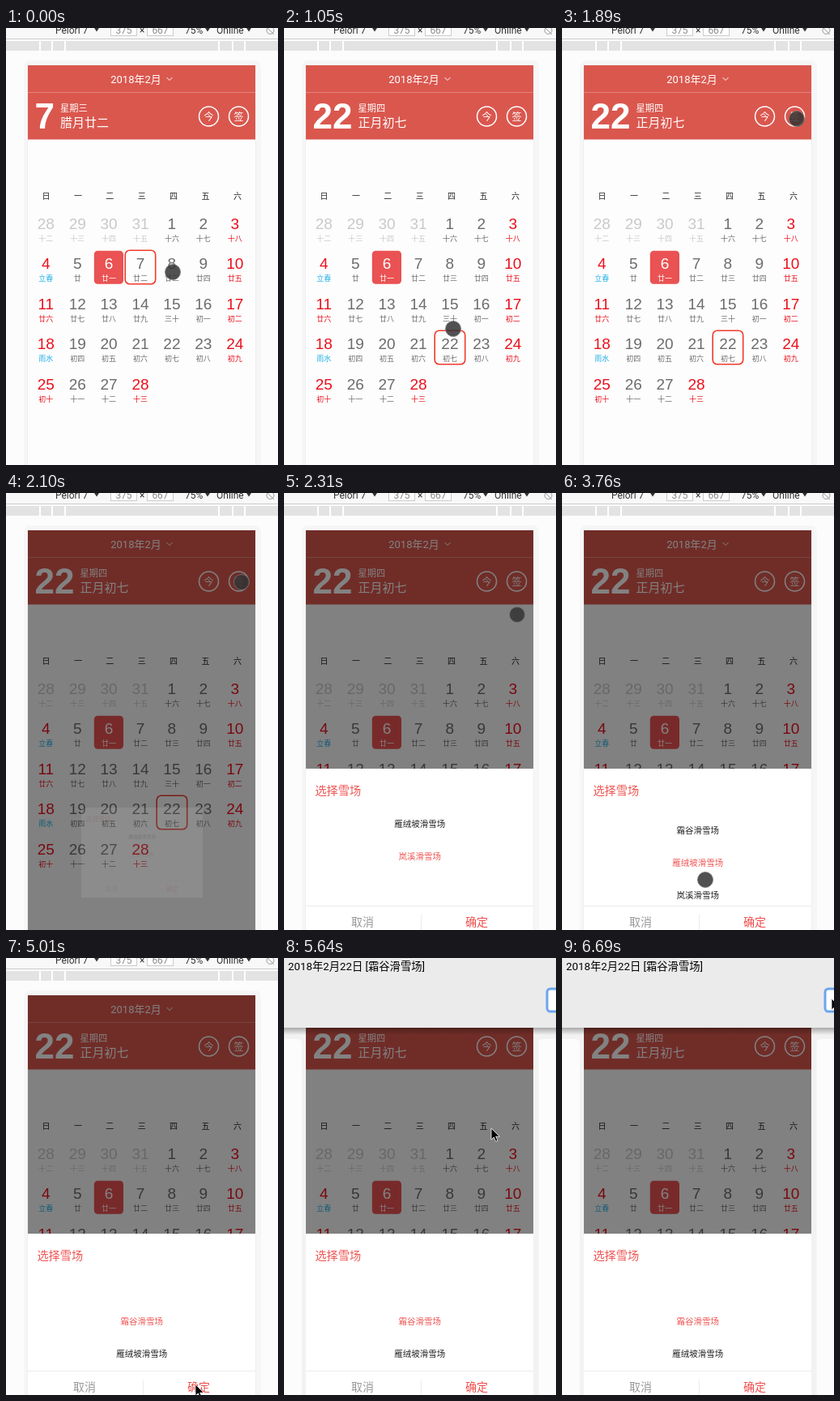
These frames come from a looping animation (336 by 539 pixels, 8000 ms). An HTML page:

```html
<!DOCTYPE html>
<html lang="zh-CN">
<head>
<meta charset="utf-8">
<title>日历签到</title>
<style>
html, body { margin: 0; width: 336px; height: 539px; overflow: hidden; background: #fcfcfc; }
svg { display: block; font-family: Roboto, "Noto Sans CJK SC", "Noto Sans CJK", sans-serif; }
.mid { text-anchor: middle; }
.bar { font-size: 12px; fill: #333; }
.size { font-size: 12px; fill: #8a8a8a; text-anchor: middle; }
.num { font: 19px "Liberation Sans", Arial, sans-serif; fill: #6c6c6c; }
.lunar { font-size: 9px; fill: #6c6c6c; }
.week { font-size: 10px; fill: #222; }
.soft text { fill: #c9c9c9; }
.rest text { fill: #ea101c; }
.term .lunar { fill: #22b0e6; }
.today text { fill: #fff; }
.light { fill: #fff; }
.line { fill: none; stroke: #fff; }
.item { font-size: 10.5px; font-weight: 500; fill: #222; text-anchor: middle; }
.item.on { font-weight: 400; fill: #ee5553; }
</style>
</head>
<body>
<svg width="336" height="539" viewBox="0 0 336 539">
  <defs>
    <linearGradient id="shade" x2="0" y2="1">
      <stop offset="0" stop-opacity=".3"/>
      <stop offset="1" stop-opacity="0"/>
    </linearGradient>
    <clipPath id="wheelClip"><rect x="27" y="389" width="281" height="119"/></clipPath>
  </defs>

  <rect width="336" height="539" fill="#fcfcfc"/>
  <rect width="336" height="13" fill="#f8f8f8"/>
  <rect y="13" width="336" height="1" fill="#c9c9c9"/>
  <g class="bar">
    <text x="61" y="7">Pelori 7</text>
    <text x="165" y="7">×</text>
    <text x="221" y="7">75%</text>
    <text x="260" y="7">Online</text>
    <path d="M109 0h6l-3 4.500zM246 0h6l-3 4.500zM297 0h6l-3 4.500z"/>
  </g>
  <g fill="#fff" stroke="#ccc"><rect x="129.500" y="-6.500" width="32" height="16"/><rect x="174.500" y="-6.500" width="32" height="16"/></g>
  <text class="size" x="145.500" y="7">375</text>
  <text class="size" x="190.500" y="7">667</text>
  <path d="M322 3a4.500 4.500 0 1 0 9 0a4.500 4.500 0 1 0-9 0M322 -1l9 9" fill="none" stroke="#999"/>
  <rect y="16" width="336" height="12" fill="#e3e3e3"/>
  <path d="M42 16v12M57 16v12M73 16v12M263 16v12M280 16v12M295 16v12" stroke="#fff" stroke-width="2"/>
  <rect x="22" y="40" width="293" height="520" rx="8" fill="#f6f6f6"/>
  <rect x="26" y="45" width="283" height="520" fill="#efefef"/>

  <rect x="27" y="46" width="281" height="493" fill="#fdfdfd"/>
  <rect x="27" y="46" width="281" height="91.500" fill="#da574e"/>
  <rect x="27" y="79" width="281" height="1" fill="#e5857e"/>
  <text class="mid light" x="160.500" y="68" font-size="13">2018年2月</text>
  <path class="line" d="M198.500 61l3.500 3.500l3.500-3.500"/>
  <text id="day" class="light" x="35.500" y="124" font-size="44" font-weight="700" font-family="Liberation Sans, Arial, sans-serif"></text>
  <g id="info" class="light">
    <text id="weekday" x="67" y="102.500" font-size="11.200"></text>
    <text id="lunarDay" x="67" y="121.500" font-size="15"></text>
  </g>
  <g class="line" stroke-width="1.500"><circle cx="250.500" cy="109" r="12"/><circle cx="287.500" cy="109" r="12"/></g>
  <g class="mid light" font-size="12"><text x="250.500" y="113.500">今</text><text x="287.500" y="113.500">签</text></g>
  <g id="calendar"></g>
  <rect id="pick" width="37.500" height="41.500" rx="5.500" fill="none" stroke="#f13a2c" stroke-width="1.600"/>
  <rect id="mask" x="27" y="46" width="281" height="493" opacity=".49"/>

  <g id="panel">
    <rect x="27" y="340" width="281" height="208" fill="#fff"/>
    <text x="38.400" y="372" font-size="14.200" fill="#ee5553">选择雪场</text>
    <g clip-path="url(#wheelClip)"><g id="wheel"></g></g>
    <path d="M27 509.500h281M169.500 520v19" stroke="#ececec"/>
    <g class="mid" font-size="14"><text x="97" y="533.500" fill="#999">取消</text><text x="238" y="533.500" fill="#ee4f4d">确定</text></g>
  </g>

  <g id="alert">
    <path d="M0 86h27v453h-5V106q0-6-6-6H0zM336 86h-28v453h6V106q0-6 6-6h16z" fill="#f2f2f2"/>
    <rect y="86" width="336" height="9" fill="url(#shade)"/>
    <rect width="336" height="86" fill="#ebebeb"/>
    <text id="message" x="5" y="15" font-size="13.300"></text>
    <rect x="325" y="38" width="70" height="28" rx="4" fill="#fff" stroke="#6ea6ee" stroke-width="3"/>
  </g>

  <g id="touch">
    <circle r="9.500" fill="#333" fill-opacity=".85" stroke="#777" stroke-opacity=".8"/>
  </g>
  <path id="arrow" d="M0 0v14l3.300-3l2.300 5.400l2.400-1l-2.300-5.200h4.600z" stroke="#fff" stroke-width=".8"/>
</svg>
<script>
const LOOP = 8000, TICK = 208.7, LAST = 32;
const SELECT = 4, OPEN = 10, ARROW = 24, ALERT = 25;
const SVG = 'http://www.w3.org/2000/svg';
const $ = id => document.getElementById(id);

function add(parent, tag, attrs, text = '') {
  const el = document.createElementNS(SVG, tag);
  for (const key in attrs) el.setAttribute(key, attrs[key]);
  el.textContent = text;
  return parent.appendChild(el);
}

// Calendar grid
const colX = c => 49.3 + 38.9 * c;
const rowY = r => 241 + 49.5 * r;
const lunar = ('十二 十三 十四 十五 十六 十七 十八 立春 廿 廿一 廿二 廿三 廿四 廿五 廿六 廿七 廿八 廿九 三十 ' +
  '初一 初二 雨水 初四 初五 初六 初七 初八 初九 初十 十一 十二 十三').split(' ');

[...'日一二三四五六'].forEach((name, c) =>
  add($('calendar'), 'text', { class: 'week mid', x: 49.5 + 39.4 * c, y: 211 }, name));

lunar.forEach((name, i) => {
  const c = i % 7, r = Math.floor(i / 7), x = colX(c), y = rowY(r);
  const date = i < 4 ? 28 + i : i - 3;
  const kinds = ['mid'];
  if (i < 4) kinds.push('soft');
  else if (c === 0 || c === 6 || date === 28) kinds.push('rest');
  if (date === 4 || date === 18) kinds.push('term');
  if (date === 6) kinds.push('today');
  const cell = add($('calendar'), 'g', { class: kinds.join(' ') });
  if (date === 6)
    add(cell, 'rect', { x: x - 18.3, y: y - 15.7, width: 36.2, height: 41, rx: 4.5, fill: '#ea5253' });
  add(cell, 'text', { class: 'num', x, y: y + 6.7 }, date);
  add(cell, 'text', { class: 'lunar', x, y: y + 21.7 }, name);
});

// Picker wheel
const resorts = ['霜谷滑雪场', '雁绒坡滑雪场', '岚溪滑雪场'];
const items = resorts.map(name => add($('wheel'), 'text', { class: 'item', x: 167.7 }, name));
$('message').textContent = `2018年2月22日 [${resorts[0]}]`;

// Keys are [step, ...values]
const touchPath = [[0, 206, 301], [3, 206, 388], [4, 206, 390], [5, 209, 371], [8, 281, 135], [9, 290, 112],
  [10, 291, 110], [11, 288, 150], [14, 243, 510], [15, 224, 470], [16, 184, 431], [17, 179, 450],
  [18, 177, 477], [19, 177, 500], [20, 180, 509], [22, 235, 523], [23, 237, 527]];
const arrowPath = [[24, 234, 526], [25, 236, 500], [26, 244, 380], [27, 256, 210], [28, 264, 102],
  [30, 298, 78], [32, 333, 50]];
const wheelPath = [[16, 0], [17, 21], [18, 48], [19, 69], [20, 80]];

function at(keys, n) {
  const end = keys.findIndex(k => k[0] >= n);
  if (end <= 0) return (end ? keys[keys.length - 1] : keys[0]).slice(1);
  const a = keys[end - 1], b = keys[end], p = (n - a[0]) / (b[0] - a[0]);
  return a.slice(1).map((v, i) => v + (b[i + 1] - v) * p);
}

const show = (el, on) => el.setAttribute('visibility', on ? 'visible' : 'hidden');
const move = (el, x, y) => el.setAttribute('transform', `translate(${x} ${y})`);

function draw(n) {
  const picked = n >= SELECT;
  $('day').textContent = picked ? '22' : '7';
  $('weekday').textContent = picked ? '星期四' : '星期三';
  $('lunarDay').textContent = picked ? '正月初七' : '腊月廿二';
  move($('info'), picked ? 24.5 : 0, 0);
  move($('pick'), picked ? 186.2 : 147.2, picked ? 373.3 : 274.3);

  show($('mask'), n >= OPEN);
  show($('panel'), n >= OPEN);
  const opening = n === OPEN;
  $('panel').setAttribute('opacity', opening ? 0.09 : 1);
  $('panel').setAttribute('transform',
    opening ? 'translate(168 443.5) scale(.534) translate(-167.5 -444)' : '');

  const [drag] = at(wheelPath, n);
  items.forEach((item, i) => {
    const y = 448 + (i - 2) * 40 + drag;
    item.setAttribute('y', y + 4);
    item.classList.toggle('on', Math.abs(y - 448) < 20);
  });

  show($('alert'), n >= ALERT);
  move($('alert'), 0, n === ALERT ? -45 : 0);
  show($('touch'), n < ARROW);
  show($('arrow'), n >= ARROW);
  move($('touch'), ...at(touchPath, n));
  move($('arrow'), ...at(arrowPath, n));
}

const start = performance.now();
function tick() {
  const time = (performance.now() - start) % LOOP;
  draw(Math.min(LAST, Math.floor(time / TICK)));
  requestAnimationFrame(tick);
}
tick();
</script>
</body>
</html>
```
